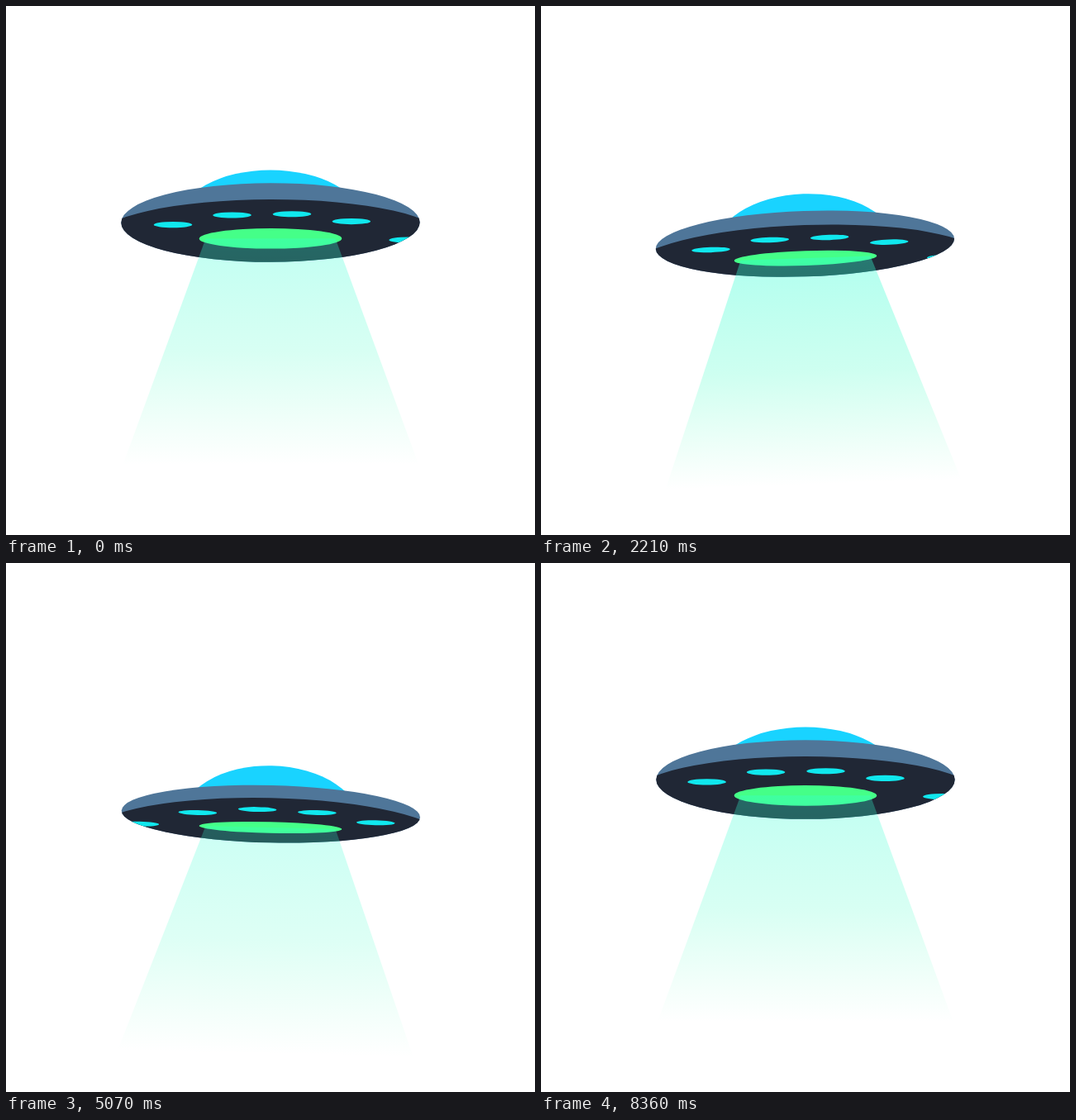
An HTML page with a canvas that plays this animation: 640 by 640 pixels, repeating every 8.43 s.

```html
<!DOCTYPE html>
<html lang="en">
<head>
<meta charset="utf-8">
<title>Flying saucer</title>
<style>
  html, body { margin: 0; width: 100%; height: 100%; overflow: hidden; background: #fff; }
  canvas { display: block; width: 640px; height: 640px; }
</style>
</head>
<body>
<canvas id="stage" width="640" height="640"></canvas>
<script>
const ctx = document.getElementById('stage').getContext('2d');
const LOOP = 8430;   // ms
const FPS = 14;
const HALF = 4.2;    // seconds for one sweep of the sway
const MID = 320;

const lerp = (a, b, f) => a + (b - a) * f;

const bezier = (a, b, s) => 3 * (1 - s) ** 2 * s * a + 3 * (1 - s) * s * s * b + s ** 3;

// cubic-bezier(.455, .03, .515, .955)
function ease(x) {
  let lo = 0, hi = 1;
  for (let i = 0; i < 24; i++) {
    const s = (lo + hi) / 2;
    if (bezier(0.455, 0.515, s) < x) lo = s; else hi = s;
  }
  return bezier(0.03, 0.955, lo);
}

// 0 -> 1 -> 0 over two sweeps
function alternate(sec) {
  const p = (sec / HALF) % 2;
  return ease(p < 1 ? p : 2 - p);
}

function ellipse(x, y, rx, ry, color, from = 0) {
  ctx.beginPath();
  ctx.ellipse(x, y, rx, ry, 0, from, Math.PI * 2);
  ctx.fillStyle = color;
  ctx.fill();
}

const ARC = 210, RISE = 80;
const sag = x => 1 - Math.sqrt(1 - (x / ARC) ** 2);

// horizontal distance from the crown after travelling len along the arc
function arcX(len) {
  const end = Math.abs(len);
  let x = 0, s = 0;
  while (s < end) {
    const slope = RISE * x / (ARC * Math.sqrt(ARC * ARC - x * x));
    const step = Math.min(1, end - s);
    x += step / Math.hypot(1, slope);
    s += step;
  }
  return Math.sign(len) * x;
}

function drawPorts(sec, cy, f) {
  const gap = 72.5;
  const shift = (sec / 2.1 % 1) * gap;
  for (let i = -4; i < 3; i++) {
    const len = 27.5 + i * gap + shift;
    if (Math.abs(len) > 218) continue;
    const x = arcX(len);
    const y = cy + lerp(-10.9, -4.8, f) + lerp(RISE, 61, f) * sag(x);
    ellipse(318.5 + x, y, 23.3, lerp(3.6, 2.9, f), '#10e8ee');
  }
}

function drawBeam(y, alpha) {
  const len = 274;
  const g = ctx.createLinearGradient(0, y, 0, y + len);
  g.addColorStop(0, `rgba(51,255,214,${alpha})`);
  g.addColorStop(0.5, `rgba(62,255,198,${alpha * 0.67})`);
  g.addColorStop(1, 'rgba(80,255,180,0)');
  ctx.fillStyle = g;
  ctx.beginPath();
  ctx.moveTo(MID - 78.5, y);
  ctx.lineTo(MID + 78.5, y);
  ctx.lineTo(MID + 179, y + len);
  ctx.lineTo(MID - 179, y + len);
  ctx.fill();
}

function draw(sec) {
  const f = alternate(sec);                             // descent and flattening
  const sway = 1 - 2 * alternate(sec + HALF / 2);       // 0, -1, 0, 1
  const cy = lerp(262, 307.5, f);
  const hatch = lerp(281.3, 323.6, f);
  const tilt = sway * 2 * Math.PI / 180;

  ctx.fillStyle = '#fff';
  ctx.fillRect(0, 0, 640, 640);
  ctx.save();
  ctx.translate(MID, hatch);
  ctx.rotate(tilt);
  ctx.translate(-MID, -hatch);

  // upper half only; the hull hides its base
  const domeRy = lerp(60, 71, f);
  ellipse(MID, cy + lerp(-63.5, -58, f) + domeRy, 110, domeRy, '#19d3ff', Math.PI);

  const bodyRy = lerp(47.8, 33.5, f);
  ctx.save();
  ellipse(MID, cy, 180.7, bodyRy, '#4f7699');
  ctx.clip();
  const underRy = lerp(47, 44, f);
  ellipse(MID, cy + lerp(-28, -18.5, f) + underRy, ARC, underRy, '#202735');
  drawPorts(sec, cy, f);
  ctx.restore();

  ellipse(MID, hatch, 86.3, lerp(12.3, 6.3, f), '#45ff88');
  drawBeam(hatch, 0.305 - 0.075 * sway);
  ctx.restore();
}

function tick() {
  const ms = Math.floor((performance.now() % LOOP) / 10) * 10;
  draw(Math.floor((ms + 5) * FPS / 1000) / FPS);
  requestAnimationFrame(tick);
}
tick();
</script>
</body>
</html>
```
